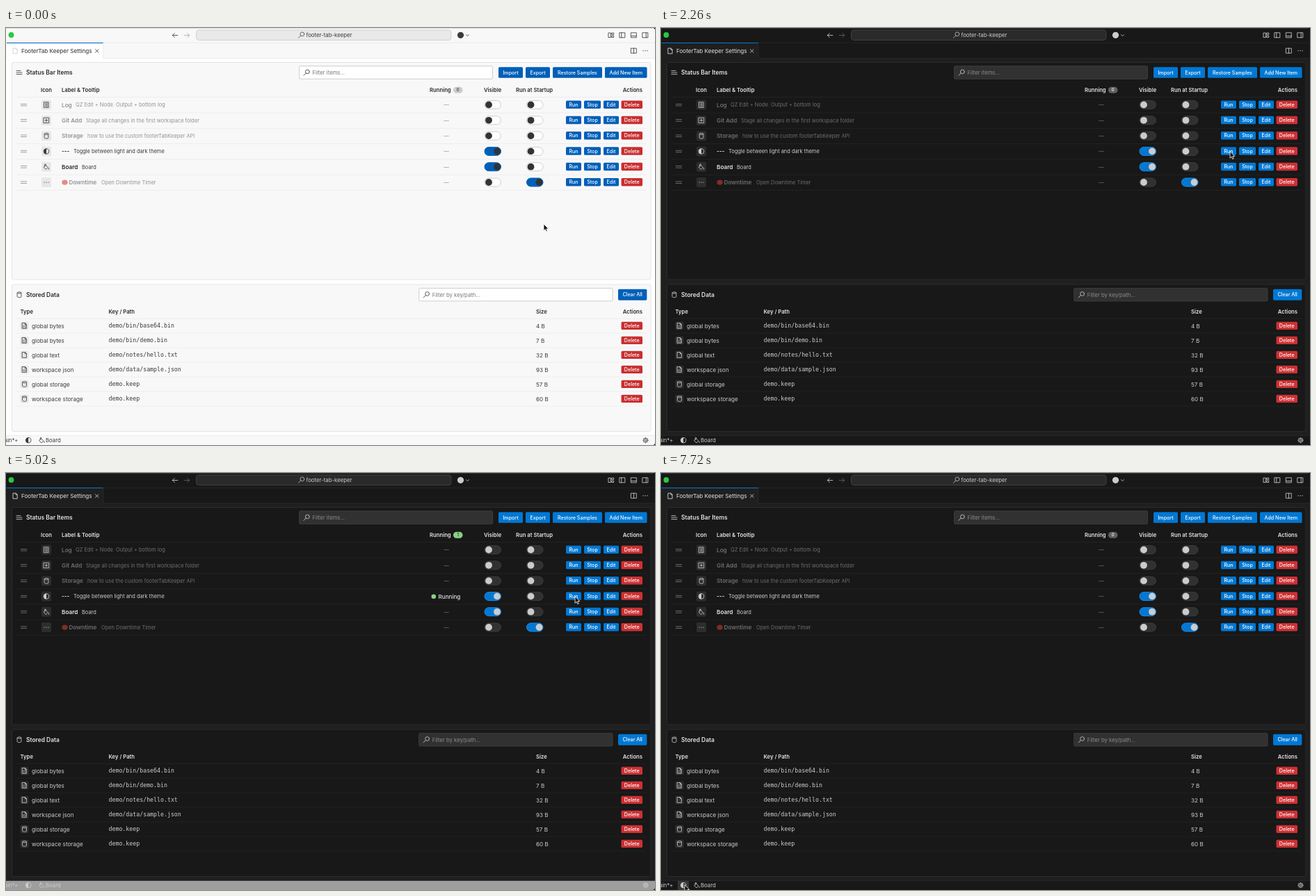
Recreate the animation shown at these times as an HTML page. Size 933x600 px, loop 8 s.

```html
<!DOCTYPE html>
<html lang="en">
<head>
<meta charset="utf-8">
<title>Settings</title>
<style>
html, body { margin: 0; width: 100%; height: 100%; overflow: hidden; background: #000; }
svg { display: block; width: 100vw; height: 100vh; font-family: Inter, "Liberation Sans", sans-serif; }
.light {
  --bar: #f8f8f8; --page: #fff; --panel: #f8f8f8; --line: #e5e5e5; --row: #ececec;
  --fg: #3b3b3b; --strong: #2a2a2a; --dim: #949494; --muted: #8a8a8a; --hint: #767676;
  --field: #fff; --fieldLine: #cecece; --search: #e9e9e9; --searchLine: #d2d2d2;
  --btn: #005fb8; --del: #c92f31; --chip: #e7e7e7; --badge: #cccccc; --badgeText: #3b3b3b;
  --run: #388a34; --runText: #fff; --off: #cecece; --onLine: #005fb8; --tabIcon: #cfcfcf; --tomato: #e58a84;
}
.dark {
  --bar: #181818; --page: #1f1f1f; --panel: #181818; --line: #2b2b2b; --row: #252525;
  --fg: #cccccc; --strong: #e4e4e4; --dim: #6d6d6d; --muted: #7d7d7d; --hint: #8b8b8b;
  --field: #313131; --fieldLine: #3c3c3c; --search: #2a2a2a; --searchLine: #414141;
  --btn: #0078d4; --del: #cd3134; --chip: #2d2d2d; --badge: #616161; --badgeText: #f8f8f8;
  --run: #89d185; --runText: #1f1f1f; --off: #3c3c3c; --onLine: #2488db; --tabIcon: #e0e0e0; --tomato: #7c3024;
}
text { white-space: pre; }
.mono { font-family: "DejaVu Sans Mono", "Liberation Mono", monospace; }
.icon { fill: none; stroke: var(--fg); stroke-width: .85; stroke-linejoin: round; stroke-linecap: round; }
</style>
</head>
<body>
<svg id="stage" class="light" viewBox="0 0 933 600" preserveAspectRatio="none"></svg>
<script>
const stage = document.getElementById('stage');
const LOOP = 8000;

const rect = (x, y, w, h, fill, r = 0, line = '') =>
  `<rect x="${x}" y="${y}" width="${w}" height="${h}" rx="${r}" style="fill:${fill};${line && `stroke:${line}`}"/>`;
const text = (x, cy, s, { size = 8.15, weight = 400, fill = 'var(--fg)', anchor = 'start', cls = '' } = {}) =>
  `<text x="${x}" y="${cy + size * .36}" class="${cls}" text-anchor="${anchor}" font-size="${size}" font-weight="${weight}" style="fill:${fill}">${s}</text>`;
const rule = (y, x = 15, w = 906) => rect(x, y, w, .8, 'var(--row)');
const dot = (x, y, r, fill) => `<circle cx="${x}" cy="${y}" r="${r}" style="fill:${fill}"/>`;
const head = (x, y, s, anchor) => text(x, y, s, { size: 7.7, weight: 600, fill: 'var(--strong)', anchor });
const button = (x, cy, w, h, s, fill = 'var(--btn)') =>
  rect(x, cy - h / 2, w, h, fill, 1.6) +
  text(x + w / 2, cy, s, { size: 7.1, weight: 500, fill: '#fff', anchor: 'middle' });

// Icon paths are centred on 0,0
const page = 'M-2.9-3.9H1L2.9-2V3.9H-2.9ZM.8-3.8V-1.8H2.8';
const shapes = {
  log: 'M-3.1-3.9H3.1V3.9H-3.1ZM-1.5-1.9H1.5M-1.5 0H1.5M-1.5 1.9H1.5',
  add: 'M-3.7-3.7H3.7V3.7H-3.7ZM-2 0H2M0-2V2',
  store: 'M-2.9-2.8C-2.9-4.3 2.9-4.3 2.9-2.8V2.8C2.9 4.3-2.9 4.3-2.9 2.8ZM-2.9-2.8C-2.9-1.3 2.9-1.3 2.9-2.8',
  half: 'M0-3.8A3.8 3.8 0 0 1 0 3.8A3.8 3.8 0 0 1 0-3.8',
  bucket: 'M-.8-2.2L2.4 1L-.5 3.7L-3.6.7ZM-.8-2.2V-3.7Q-2.3-4.6-2.3-2.8V-.8M3.5 1.8V3.4',
  more: 'M-3 0h.1M0 0h.1M3 0h.1',
  page,
  bytes: page + 'M-1.3-.6V.5M1.2-.6V.5M-1.3 1.6V2.6M1.2 1.6V2.6',
  json: page + 'M-.7-.1L-1.7 1.1L-.7 2.3M.7-.1L1.7 1.1L.7 2.3',
  lens: 'M4.3-1.2A2.9 2.9 0 0 1-1.5-1.2A2.9 2.9 0 0 1 4.3-1.2M-.7.9L-4.1 4.1',
  menu: 'M-4-2.6H2M-4 0H4M-4 2.6H4',
  close: 'M-2.3-2.3L2.3 2.3M2.3-2.3L-2.3 2.3',
  back: 'M3.8 0H-3.6M-.7-3L-3.7 0L-.7 3',
  next: 'M-3.8 0H3.6M.7-3L3.7 0L.7 3',
  down: 'M-2-.9L0 1.1L2-.9',
  grid: 'M-3.7-3.2H-.7V3.2H-3.7ZM1-3.2H3.7V-.9H1ZM1 .9H3.7V3.2H1Z',
  left: 'M-3.8-3.5H3.8V3.5H-3.8ZM-1.2-3.5V3.5',
  bottom: 'M-3.8-3.5H3.8V3.5H-3.8ZM-3.8 1.2H3.8',
  right: 'M-3.8-3.5H3.8V3.5H-3.8ZM1.2-3.5V3.5',
  split: 'M-3.8-3.5H3.8V3.5H-3.8ZM0-3.5V3.5',
  gear: 'M1.3 0A1.3 1.3 0 0 1-1.3 0A1.3 1.3 0 0 1 1.3 0M3 0A3 3 0 0 1-3 0A3 3 0 0 1 3 0M0-3V-3.8M0 3V3.8M-3 0H-3.8M3 0H3.8M2.1 2.1L2.7 2.7M-2.1-2.1L-2.7-2.7M2.1-2.1L2.7-2.7M-2.1 2.1L-2.7 2.7'
};
const icon = (name, x, y, style = '') =>
  `<g transform="translate(${x} ${y})"><path class="icon" d="${shapes[name]}" style="${style}"/>` +
  (name === 'half' ? '<path d="M0-3.8A3.8 3.8 0 0 0 0 3.8Z" style="fill:var(--fg)"/>' : '') + '</g>';

const toggle = (x, cy, on) =>
  rect(x, cy - 6, 23.5, 12, on ? 'var(--trackOn)' : 'var(--trackOff)', 6, on ? 'var(--onLine)' : 'var(--off)') +
  dot(x + (on ? 18 : 6), cy, 4.9, on ? 'var(--knobOn)' : 'var(--knobOff)');

const field = (x, y, w, hint) =>
  rect(x, y, w, 18.5, 'var(--field)', 1.5, 'var(--fieldLine)') + icon('lens', x + 10.5, y + 9.3) +
  text(x + 19, y + 9.5, hint, { size: 7.7, fill: 'var(--hint)' });

function titleBar() {
  return rect(0, 0, 933, 44, 'var(--bar)') + rect(0, 0, 933, .7, 'var(--searchLine)') +
    dot(7.5, 10, 3.9, '#28c840') +
    icon('back', 243, 10.5) + icon('next', 260, 10.5, 'opacity:.4') +
    rect(273.5, 3, 366.5, 14.5, 'var(--search)', 4, 'var(--searchLine)') +
    icon('lens', 424.5, 10, 'stroke-width:.75') + text(431.5, 10.3, 'footer-tab-keeper', { size: 7.8 }) +
    dot(653.5, 10.3, 4.6, 'var(--fg)') + icon('down', 663.5, 10.5) +
    icon('grid', 870, 10.3) + icon('left', 886, 10.3) + icon('bottom', 902.5, 10.3) + icon('right', 919, 10.3) +
    rect(0, 20.8, 933, .7, 'var(--line)') + rect(0, 43.3, 933, .7, 'var(--line)') +
    rect(1, 21, 139, 23.2, 'var(--page)') + rect(1, 21, 139, 1, 'var(--btn)') + rect(139.6, 21, .8, 23, 'var(--line)') +
    icon('page', 13.3, 33, 'stroke:var(--tabIcon)') + text(22, 33, 'FooterTab Keeper Settings', { fill: 'var(--strong)' }) +
    icon('close', 130.7, 33) + icon('split', 902.5, 32.7) + icon('more', 919, 32.7, 'stroke-width:1.2');
}

const items = [
  ['log', 'Log', 100, 'QZ Edit + Node. Output + bottom log', 0, 0],
  ['add', 'Git Add', 115, 'Stage all changes in the first workspace folder', 0, 0],
  ['store', 'Storage', 117, 'how to use the custom footerTabKeeper API', 0, 0],
  ['half', '---', 97, 'Toggle between light and dark theme', 1, 0],
  ['bucket', 'Board', 109, 'Board', 1, 0],
  ['more', 'Downtime', 137, 'Open Downtime Timer', 0, 1]
];

function itemRow([glyph, label, tipX, tip, visible, startup], i) {
  const y = 110.6 + 22.3 * i, last = i === 5;
  const fill = visible ? 'var(--strong)' : 'var(--dim)';
  const dash = text(633, y, '—', { size: 7.5, fill: 'var(--muted)', anchor: 'middle' });
  return rect(21, y - 1.6, 9, .8, 'var(--muted)') + rect(21, y + .9, 9, .8, 'var(--muted)') +
    rect(51, y - 7, 14, 14, 'var(--chip)', 2) + icon(glyph, 58, y, glyph === 'more' ? 'stroke-width:1.2' : '') +
    (last ? `<ellipse cx="84.5" cy="${y}" rx="4.2" ry="3.7" style="fill:var(--tomato)"/>` : '') +
    text(last ? 90.5 : 80, y, label, { size: 8.2, weight: 600, fill }) +
    text(tipX, y + .2, tip, { size: 7.45, fill: visible ? 'var(--fg)' : 'var(--dim)' }) +
    (i === 3 ? `<g id="idle">${dash}</g>` : dash) +
    toggle(688, y - .1, visible) + toggle(748.5, y - .1, startup) +
    button(805, y - .4, 22, 11.5, 'Run') + button(831, y - .4, 24, 11.5, 'Stop') +
    button(859, y - .4, 22, 11.5, 'Edit') + button(884.5, y - .4, 30.5, 11.5, 'Delete', 'var(--del)') +
    rule(y + 11);
}

const badge = (n, fill, ink) =>
  rect(643, 84.7, 13.5, 9, fill, 4.5) + text(649.7, 89.2, n, { size: 6, weight: 500, fill: ink, anchor: 'middle' });

function itemsPanel() {
  return rect(8.5, 49.5, 918.5, 312.5, 'var(--panel)', 2.5, 'var(--line)') +
    icon('menu', 19, 64) + text(29, 64.3, 'Status Bar Items', { size: 8.45, weight: 600, fill: 'var(--strong)' }) +
    field(421.5, 54.8, 278, 'Filter items...') +
    button(708, 64, 35, 15.5, 'Import') + button(747, 64, 35, 15.5, 'Export') +
    button(786, 64, 71, 15.5, 'Restore Samples') + button(861, 64, 60.5, 15.5, 'Add New Item') +
    head(58, 89, 'Icon', 'middle') + head(80, 89, 'Label &amp; Tooltip') + head(609, 89, 'Running') +
    head(687, 89, 'Visible') + head(733, 89, 'Run at Startup') + head(915, 89, 'Actions', 'end') +
    rule(99) + items.map(itemRow).join('') +
    `<g id="none">${badge('0', 'var(--badge)', 'var(--badgeText)')}</g>` +
    `<g id="running">${badge('1', 'var(--run)', 'var(--runText)')}${dot(614.8, 177.7, 3.3, 'var(--run)')}` +
    text(621.5, 177.7, 'Running', { weight: 500, fill: 'var(--strong)' }) + '</g>';
}

const stored = [
  ['bytes', 'global bytes', 'demo/bin/base64.bin', 4],
  ['bytes', 'global bytes', 'demo/bin/demo.bin', 7],
  ['page', 'global text', 'demo/notes/hello.txt', 32],
  ['json', 'workspace json', 'demo/data/sample.json', 93],
  ['store', 'global storage', 'demo.keep', 57],
  ['store', 'workspace storage', 'demo.keep', 60]
];

function storedRow([glyph, type, key, size], i) {
  const y = 428.4 + 21 * i;
  return rect(20.5, y - 6, 12, 12, 'var(--chip)', 2) + icon(glyph, 26.5, y) + text(37, y + .2, type) +
    text(147.5, y, key, { size: 8.26, cls: 'mono' }) + text(762, y + .2, size + ' B') +
    button(884.5, y, 30.5, 11.2, 'Delete', 'var(--del)') + rule(y + 10.2);
}

function storedPanel() {
  return rect(8.5, 369, 918.5, 211.5, 'var(--panel)', 2.5, 'var(--line)') +
    icon('store', 19, 383.8) + text(29, 384, 'Stored Data', { size: 8.45, weight: 600, fill: 'var(--strong)' }) +
    field(593.7, 374.4, 278.3, 'Filter by key/path...') + button(880, 383.7, 41.3, 16, 'Clear All') +
    head(20.5, 408, 'Type') + head(147.5, 408, 'Key / Path') + head(762, 408, 'Size') +
    head(915, 408, 'Actions', 'end') + rule(417.7) + stored.map(storedRow).join('');
}

function statusBar() {
  return rect(0, 586.5, 933, 13.5, 'var(--status)') + rect(0, 586, 933, .7, 'var(--line)') +
    `<g id="hover">${rect(24, 587, 16, 13, 'var(--hoverFill, #373737)')}</g>` +
    text(17.5, 593.2, 'main*+', { size: 7.8, anchor: 'end' }) +
    icon('half', 32.2, 593.2) + icon('bucket', 51.5, 593.2) +
    text(57, 593.2, 'Board', { size: 7.8 }) + icon('gear', 919.5, 593.2);
}

stage.innerHTML =
  '<defs><clipPath id="window"><path d="M0 0H929Q933 0 933 4V596Q933 600 929 600H0Z"/></clipPath></defs>' +
  '<g clip-path="url(#window)">' + rect(0, 0, 933, 600, 'var(--page)') +
  titleBar() + itemsPanel() + storedPanel() + statusBar() + '</g>' +
  '<path id="cursor" d="M0 0V9.7L2.2 7.6 3.7 11 5.3 10.3 3.8 7H6.8Z" fill="#111" stroke="#fff" stroke-width=".8" stroke-linejoin="round"/>';

const part = id => document.getElementById(id);
const [cursor, hover, idle, none, running] = ['cursor', 'hover', 'idle', 'none', 'running'].map(part);

const clamp = v => Math.min(1, Math.max(0, v));
const linear = u => u;
const smooth = u => u * u * (3 - 2 * u);
const easeOut = u => 1 - (1 - u) ** 1.7;
const mix = (a, b, u) => `rgb(${a.map((v, i) => Math.round(v + (b[i] - v) * u))})`;

// time, x, y, easing towards this point
const path = [
  [0, 773, 282], [20, 773, 282], [760, 818, 177.5, smooth], [5880, 818, 177.5],
  [6040, 800, 188], [6200, 715, 237.5], [6300, 590, 317], [6380, 523, 360],
  [6720, 523, 360], [7520, 38, 590, smooth], [7720, 34, 592.5], [LOOP, 34, 592.5]
];
function cursorAt(t) {
  const i = path.findIndex(p => p[0] > t), [t0, x0, y0] = path[i - 1], [t1, x1, y1, ease = linear] = path[i];
  const u = ease((t - t0) / (t1 - t0));
  return [x0 + (x1 - x0) * u, y0 + (y1 - y0) * u];
}

// from, theme, bar fade start, toggle fade start, running from, running to
const phases = [
  [0, 'light', -999, -999, 0, 0],
  [1820, 'dark', 1802, 1815, 1900, 2260],
  [3420, 'light', 3404, 3415, 3500, 3760],
  [5020, 'dark', 4982, 4800, 5020, 5260]
];
const tones = {
  light: { status: [248, 248, 248], trackOff: [255, 255, 255], trackOn: [0, 95, 184], knobOff: [51, 51, 51], knobOn: [51, 51, 51] },
  dark: { status: [24, 24, 24], trackOff: [49, 49, 49], trackOn: [0, 120, 212], knobOff: [204, 204, 204], knobOn: [204, 204, 204] }
};
const show = (el, on) => el.setAttribute('visibility', on ? 'visible' : 'hidden');

function draw(t) {
  const [, theme, barStart, toggleStart, runFrom, runTo] = phases.filter(p => p[0] <= t).pop();
  const from = tones[theme === 'dark' ? 'light' : 'dark'], to = tones[theme];
  stage.setAttribute('class', theme);
  for (const key in to) {
    const u = key === 'status' ? easeOut(clamp((t - barStart) / 150)) : smooth(clamp((t - toggleStart) / 200));
    stage.style.setProperty('--' + key, mix(from[key], to[key], u));
  }
  const busy = t >= runFrom && t < runTo;
  show(running, busy);
  show(idle, !busy);
  show(none, !busy);
  const [x, y] = cursorAt(t);
  cursor.setAttribute('transform', `translate(${x} ${y})`);
  show(hover, y > 586 && x < 41);
}

const start = performance.now();
function tick() {
  draw((performance.now() - start) % LOOP);
  requestAnimationFrame(tick);
}
tick();
</script>
</body>
</html>
```
